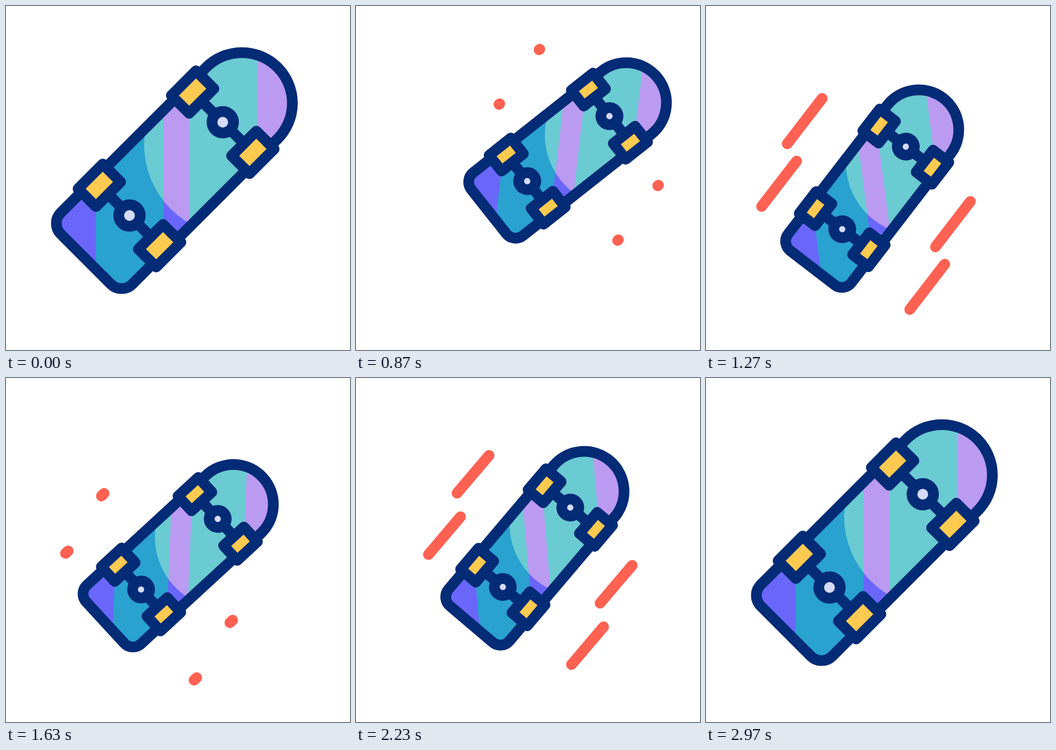
Animation of 640x640 px, one loop 3000 ms. Source, as an HTML page:

```html
<!DOCTYPE html>
<html lang="en">
<head>
<meta charset="utf-8">
<title>Skateboard</title>
<style>
html, body { margin: 0; height: 100%; overflow: hidden; background: #fff; }
svg { display: block; width: 100vw; height: 100vh; }
#ink { stroke: #042b76; stroke-linejoin: round; fill: none; }
#streaks { stroke: #ff6152; stroke-width: 20; stroke-linecap: round; }
</style>
</head>
<body>
<svg viewBox="0 0 640 640">
  <defs>
    <path id="deck" d="M-94-173A94 94 0 0 1 94-173V209.5a28 28 0 0 1-28 28H-66a28 28 0 0 1-28-28Z"/>
    <circle id="shine" cx="45.6" cy="-109.2" r="169"/>
    <path id="stripes" transform="rotate(-45)" d="M-400-400h250.5v800h-250.5zM-23.5-400h48v800h-48zM150.5-400h250v800h-250z"/>
    <clipPath id="inDeck"><use href="#deck"/></clipPath>
    <clipPath id="inShine"><use href="#shine"/></clipPath>
    <rect id="wheel" x="-23.5" y="-32.5" width="47" height="65" fill="#ffca50"/>
    <g id="truck">
      <path d="M-60 0H60"/>
      <circle r="20" fill="#d5dbfa"/>
      <use href="#wheel" x="-79.3"/>
      <use href="#wheel" x="79.3"/>
    </g>
  </defs>
  <g id="rig">
    <g id="streaks"></g>
    <g id="board">
      <g clip-path="url(#inDeck)">
        <use href="#deck" fill="#29a2cf"/>
        <use href="#stripes" fill="#6b66fa"/>
        <use href="#shine" fill="#6acbd2"/>
        <g clip-path="url(#inShine)"><use href="#stripes" fill="#bb9af2"/></g>
      </g>
      <g id="ink">
        <use href="#deck"/>
        <use href="#truck" y="-122.7"/>
        <use href="#truck" y="122.7"/>
      </g>
    </g>
  </g>
</svg>
<script>
const $ = id => document.getElementById(id);
const FPS = 30, LOOP = 3000, LINE_WIDTH = 20;
const SHRINK = .21, SWING = 8;
const STREAK = 106.5, GROW = 13, BURSTS = [25, 57];

// Places the board visits, and the ticks at which it slides and tilts
const rest = { x: 316.5, y: 303 }, high = { x: 396, y: 264.5 },
      low = { x: 299, y: 350.5 }, middle = { x: 366, y: 286 };
const stops = [rest, high, low, middle, low, rest];
const slideTicks = [5, 25, 42, 59.5, 75.6, 88.7];
const tiltTicks = [5, 23, 40, 55, 72, 87];
const tilts = stops.map((stop, i) => stop === rest ? 45 : 45 + (i % 2 ? SWING : -SWING));

function ease(n, from, to) {
  const p = Math.min(1, Math.max(0, (n - from) / (to - from)));
  return p * p * (3 - 2 * p);
}

function follow(values, ticks, n) {
  return values.reduce((sum, v, i) =>
    i ? sum + (v - values[i - 1]) * ease(n, ticks[i - 1], ticks[i]) : v, 0);
}

// Two streaks on each side, mirrored through one point
const streaks = [];
for (const side of [-1, 1]) {
  for (const [dx, dy] of [[184.4, 52.6], [151, -68.9]]) {
    const line = document.createElementNS("http://www.w3.org/2000/svg", "line");
    const x = 6.4 + side * dx;
    line.setAttribute("x1", x);
    line.setAttribute("x2", x);
    $("streaks").append(line);
    streaks.push({ line, y: side * dy - 20.5 });
  }
}

function drawStreaks(n) {
  const start = BURSTS.find(b => n > b && n < b + 2 * GROW);
  $("streaks").style.display = start ? "" : "none";
  if (!start) return;
  const back = STREAK * ease(n, start, start + GROW);
  const front = STREAK * ease(n, start + GROW, start + 2 * GROW);
  for (const { line, y } of streaks) {
    line.setAttribute("y1", y + front);
    line.setAttribute("y2", y + back);
  }
}

function draw(n) {
  const x = follow(stops.map(s => s.x), slideTicks, n);
  const y = follow(stops.map(s => s.y), slideTicks, n);
  const tilt = follow(tilts, tiltTicks, n);
  const scale = 1 - SHRINK * (ease(n, 5, 28) - ease(n, 75, 88.7));
  $("rig").setAttribute("transform", `translate(${x} ${y}) rotate(${tilt})`);
  $("board").setAttribute("transform", `scale(${scale})`);
  // Outlines keep their width while the board shrinks
  $("ink").setAttribute("stroke-width", LINE_WIDTH / scale);
  drawStreaks(n);
}

// The motion advances in steps of 1/30 s
function tick() {
  const t = performance.now() % LOOP;
  draw(Math.floor(t * FPS / 1000 + .12));
  requestAnimationFrame(tick);
}
tick();
</script>
</body>
</html>
```
